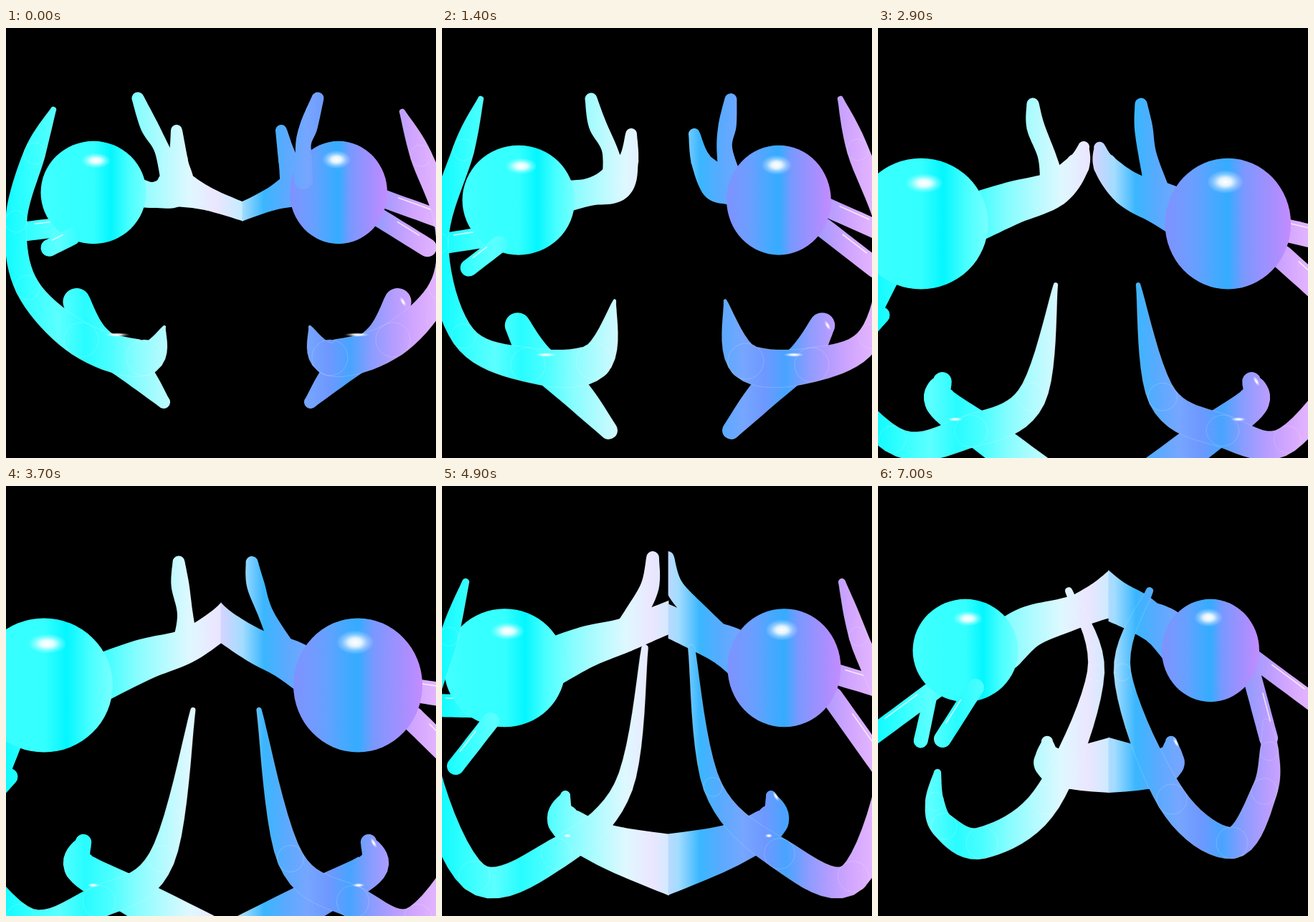
Animation of 600x600 px, one loop 7.1 s. Source, as an HTML page:

```html
<!DOCTYPE html>
<html lang="en">
<head>
<meta charset="utf-8">
<title>Mirrored limbs</title>
<style>
html, body { margin: 0; width: 100%; height: 100%; overflow: hidden; background: #000; }
svg { display: block; width: 100vw; height: 100vh; }
</style>
</head>
<body>
<svg viewBox="0 0 600 600">
  <defs id="defs">
    <clipPath id="clipL"><rect id="cutL" x="-200" y="-100" width="500" height="900"/></clipPath>
    <clipPath id="clipR"><rect id="cutR" x="300" y="-100" width="600" height="900"/></clipPath>
  </defs>
  <rect width="600" height="600"/>
  <g id="L" clip-path="url(#clipL)" fill="url(#skinL)"></g>
  <g id="R" clip-path="url(#clipR)" fill="url(#skinR)"></g>
</svg>
<script>
const LOOP = 7100, STEP = 100;
const TIMES = [0, 1400, 2900, 3700, 4900, 5700, 7000];
const $ = id => document.getElementById(id);

function add(parent, tag, attrs = {}) {
  const el = document.createElementNS('http://www.w3.org/2000/svg', tag);
  for (const k in attrs) el.setAttribute(k, attrs[k]);
  return $(parent).appendChild(el);
}

// Evenly spaced colour stops.
function gradient(id, colors, attrs, tag = 'linearGradient') {
  add('defs', tag, { id, ...attrs });
  colors.split(' ').forEach((c, i, all) =>
    add(id, 'stop', { offset: i / (all.length - 1), 'stop-color': c }));
}
const wide = (x1, x2) => ({ gradientUnits: 'userSpaceOnUse', x1, y1: 0, x2, y2: 0 });
gradient('skinL', '#12fbff #38ffff #5cffff #28fcff #4cfeff #88fdff #b4fbff #dff8ff #ebe6ff #c4ecff', wide(0, 330));
gradient('skinR', '#d6d4ff #a2dcff #3ab6ff #5aaaff #76a6ff #6f98ff #48a4ff #8a9cff #b49cff #d2a6ff #e2b4ff', wide(300, 600));
gradient('ballL', '#44ffff #3affff #36ffff #34ffff #04f6ff #48ffff #78ffff', {});
gradient('ballR', '#7f92ff #7499ff #66a0ff #4aa8ff #34acff #7a98ff #9492ff #aa8eff #c48cff', {});
gradient('gloss', '#fff #fffd #fff5 #fff0', {}, 'radialGradient');

// Monotone cubic through key poses.
function pose(keys, t) {
  const n = TIMES.length - 1;
  let i = 0;
  while (i < n - 1 && t >= TIMES[i + 1]) i++;
  const h = TIMES[i + 1] - TIMES[i], u = Math.min(1, (t - TIMES[i]) / h), v = 1 - u;
  return keys[0].map((_, c) => {
    const slope = j => (keys[j + 1][c] - keys[j][c]) / (TIMES[j + 1] - TIMES[j]);
    const tangent = j => {
      if (j === 0) return slope(0);
      if (j === n) return slope(n - 1);
      const a = slope(j - 1), b = slope(j);
      return a * b > 0 ? 2 * a * b / (a + b) : 0;
    };
    const a = keys[i][c], b = keys[i + 1][c];
    return a + (b - a) * u * u * (3 - 2 * u) + h * u * v * (tangent(i) * v - tangent(i + 1) * u);
  });
}
const num = (list, t) => pose(list.map(v => [v]), t)[0];

const spline = (a, b, c, d, u) =>
  b + u * ((c - a) / 2 + u * (a - 2.5 * b + 2 * c - d / 2 + u * (1.5 * (b - c) + (d - a) / 2)));

// Outline of a round tube through [x, y, radius] points.
function outline(pts) {
  const n = pts.length, fine = [], left = [], right = [];
  const p = i => pts[Math.max(0, Math.min(n - 1, i))];
  for (let s = 0; s <= (n - 1) * 10; s++) {
    const i = Math.min(n - 2, Math.floor(s / 10));
    fine.push(p(i).map((_, c) => spline(p(i - 1)[c], p(i)[c], p(i + 1)[c], p(i + 2)[c], s / 10 - i)));
  }
  fine.forEach(([x, y, r], i) => {
    const a = fine[Math.max(0, i - 1)], b = fine[Math.min(fine.length - 1, i + 1)];
    const dx = b[0] - a[0], dy = b[1] - a[1], k = r / (Math.hypot(dx, dy) || 1);
    left.push([x + dy * k, y - dx * k]);
    right.unshift([x - dy * k, y + dx * k]);
  });
  const xy = q => q.map(z => z.toFixed(1)).join(' ');
  const line = q => q.map(xy).join('L');
  const cap = (r, q) => `A${r} ${r} 0 0 1 ${xy(q)}`;
  let d = 'M' + line(left) + cap(p(n)[2], right[0]) + 'L' + line(right) + cap(p(0)[2], left[0]) + 'Z';
  for (const [x, y, r] of pts.slice(1, -1))
    d += `M${x - r} ${y}` + cap(r, [x + r, y]) + cap(r, [x - r, y]) + 'Z';
  return d;
}

// Pairs of coordinates per key; radii blend through a few profiles.
const limb = (keys, profiles, blend) => t => {
  const xy = pose(keys, t), w = num(blend, t);
  const i = Math.min(profiles.length - 2, Math.floor(w)), u = w - i;
  return profiles[i].map((r, j) => [xy[2 * j], xy[2 * j + 1], r + (profiles[i + 1][j] - r) * u]);
};
const flip = (pts, sum) => pts.map(([x, y, r], i) => [sum(i) - x, y, r]);

// Long hook, from outer tip to inner tip
const hook = limb([
  [66,114, 40,175, 14,270, 30,362, 105,435, 193,460, 221,417],
  [54,99, 30,170, -6,300, 30,430, 120,470, 212,465, 241,380],
  [-60,110, -100,230, -100,420, 20,574, 130,562, 214,515, 248,358],
  [-60,115, -100,240, -100,430, 20,603, 130,580, 217,520, 261,312],
  [33,134, 10,210, -28,360, 45,545, 160,513, 253,420, 283,226],
  [45,344, 38,400, 42,455, 105,500, 225,442, 290,330, 288,169],
  [83,400, 79,440, 92,475, 145,498, 235,437, 304,260, 266,146]
], [[4, 15, 15, 17, 24, 25, 2], [5, 13, 18, 22, 21, 12, 5]], [0, 0, .35, .5, .9, 1, 1]);
const tipShift = [[-26,3], [-26,0], [-66,20], [-64,20], [-40,0], [-50,-134], [-20,-70]];

// Lower hand, from knob outwards
const hand = limb([
  [98,381, 122,432, 180,478, 220,522],
  [105,414, 132,460, 185,508, 233,562],
  [90,492, 88,522, 150,568, 240,635],
  [108,497, 104,532, 175,572, 290,635],
  [172,432, 170,467, 230,502, 335,532],
  [207,386, 208,416, 255,437, 335,446],
  [236,357, 240,386, 270,394, 335,389]
], [[19, 22, 21, 9], [7, 23, 30, 44]], [0, .1, .5, .65, 1, 1, .9]);

// Arm beyond the ball: wrist, palm, knuckle, fingertip
const arm = limb([
  [205,233, 236,222, 240,185, 238,143],
  [205,229, 242,216, 260,185, 264,148],
  [185,245, 245,225, 278,192, 287,166],
  [190,243, 250,224, 295,196, 325,172],
  [200,225, 255,208, 310,186, 340,176],
  [210,213, 260,195, 310,172, 340,160],
  [210,197, 262,180, 310,165, 340,156]
], [[18, 26, 14, 8], [30, 25, 17, 8], [29, 24, 22, 24]], [0, .1, 1, 2, 2, 2, 2]);

// Raised finger above the palm
const finger = limb([
  [218,170, 200,137, 184,98],
  [234,170, 217,135, 208,99],
  [236,180, 220,138, 216,106],
  [250,180, 243,138, 241,106],
  [270,180, 290,140, 294,100],
  [270,172, 303,140, 325,98],
  [280,172, 312,148, 340,122]
], [[11, 12.5, 8.5], [17, 13, 9], [21, 17, 15]], [0, 0, .3, 0, .8, 2, 2]);

// Mirror sums (left x + right x) and other tracks
const depth = [0, .22, .9, 1, .5, .14, 0];
const seam = [330, 310, 297, 300, 316, 318, 322];
const lowSum = [645, 636, 611, 614, 631, 640, 645];
const palmSum = [646, 627, 595, 600, 615, 620, 622];
const tipSum = [622, 616, 596, 600, 625, 630, 640];
const fingerSum = [619, 611, 583, 584, 609, 625, 644];
const farLeg = [[25,284], [0,301], [-15,400], [-14,402], [-10,306], [-10,328], [-10,350]];
const nearLeg = [[92,291, 60,307], [80,302, 37,335], [5,400, -40,450], [5,405, -40,455],
  [68,328, 19,391], [106,299, 62,361], [136,281, 90,353]];
const highLeg = [270, 285, 293, 292, 282, 295, 308];
const lowLeg = [[589,307], [605,335], [620,370], [620,376], [612,390], [568,350], [545,352]];
const sheen = [[155,428], [145,456], [108,546], [122,557], [175,488], [204,452], [225,428]];

// Elements in painting order
const els = {};
const make = (side, tag, names, attrs) => names.split(' ').forEach(k => els[k + side] = add(side, tag, attrs));
const streak = { stroke: '#fff', 'stroke-width': 1.6, 'stroke-linecap': 'round', opacity: .75 };
const rim = { stroke: '#fff', 'stroke-opacity': .18 };
const gloss = { fill: 'url(#gloss)' };
for (const side of 'LR') {
  const near = () => { make(side, 'path', 'near'); make(side, 'path', 'nearLine', streak); };
  make(side, 'path', 'far');
  make(side, 'path', 'farLine', streak);
  if (side === 'R') near();
  make(side, 'path', 'extra arm finger tail');
  make(side, 'ellipse', 'ball', { fill: `url(#ball${side})` });
  make(side, 'ellipse', 'shine', gloss);
  make(side, 'path', 'front');
  if (side === 'L') near();
  make(side, 'path', 'hand');
  make(side, 'path', 'hook', rim);
  make(side, 'ellipse', 'sheen glint', gloss);
}

const path = (name, pts) => els[name].setAttribute('d', outline(pts));
const oval = (name, cx, cy, rx, ry) =>
  Object.entries({ cx, cy, rx, ry }).forEach(([k, v]) => els[name].setAttribute(k, v.toFixed(2)));

function leg(name, side, x, y, X, Y, r) {
  path(name + side, [[x, y, r], [X, Y, r]]);
  const len = Math.hypot(X - x, Y - y), s = (side === 'L' ? -1 : 1) * r * .65 / len;
  const at = u => `${x + (X - x) * u + (Y - y) * s} ${y + (Y - y) * u - (X - x) * s}`;
  els[name + 'Line' + side].setAttribute('d', `M${at(.3)}L${at(.75)}`);
}

function draw(t) {
  const k = num(depth, t), cut = num(seam, t);
  $('cutL').setAttribute('width', cut + 200.4);
  $('cutR').setAttribute('x', cut - .4);

  const r = 71.7 + 21.8 * k, y = 229.5 + 48.5 * k;
  const xL = 122 - 69 * k, rL = r * 1.025, xR = 464 + 27 * k, rR = 68 + 22 * k;
  oval('ballL', xL, y, rL, r);
  oval('ballR', xR, y, rR, r);
  oval('shineL', xL + .05 * r, y - .62 * r, .29 * r, .15 * r);
  oval('shineR', xR - .04 * r, y - .64 * r, .28 * r, .18 * r);

  // Upper limbs
  const palm = num(palmSum, t), tip = num(tipSum, t), point = num(fingerSum, t);
  const armL = arm(t), armR = flip(armL, i => [palm - 15, palm, (palm + tip) / 2, tip][i]);
  const upL = finger(t), upR = flip(upL, i => point + (650 - point) * ((2 - i) / 3) ** 2);
  const base = armL[0][2] + 5;
  path('armL', [[xL + .7 * r, y - .05 * r, base], ...armL]);
  path('armR', [[xR - .5 * r, y - .05 * r, base], ...armR]);
  path('fingerL', [[armL[1][0], armL[1][1], 19], ...upL]);
  path('fingerR', [[armR[0][0], armR[0][1], 19], ...upR]);

  // The joined wrist that lets go early on
  const hold = Math.max(0, 1 - t / TIMES[1]);
  const tail = [armL, armR].map(([, [px, py]], side) => [[0, 28], [.5, 16], [1.18, 12]].map(([u, w]) =>
    [px + (cut - px) * u * hold, py + 34 * u * hold, w * hold]));
  ['L', 'R'].forEach((s, i) => els['tail' + s].setAttribute('d', hold ? outline(tail[i]) : ''));
  els.frontR.setAttribute('d', hold
    ? outline([[armR[1][0] + 5, armR[1][1] - 10, 13 * hold], [upR[0][0], upR[0][1] + 10, 12 * hold]]) : '');

  // Legs
  const [fx, fy] = pose(farLeg, t), [nx, ny] = pose(lowLeg, t);
  leg('far', 'L', xL - .45 * r, y + .65 * r, fx, fy, 13.5 + 5 * k);
  leg('near', 'L', ...pose(nearLeg, t), 12);
  leg('far', 'R', xR + .75 * rR, y + .06 * r, 615, num(highLeg, t), 12.5 + 4 * k);
  leg('near', 'R', xR + .85 * rR, y + .5 * r, nx, ny, 13 + 4 * k);
  const grow = Math.max(0, (t - TIMES[5]) / (TIMES[6] - TIMES[5]));
  const ex = xL - .62 * r, ey = y + .62 * r;
  path('extraL', [[ex, ey, 9], [ex - 18 * grow, ey + 82 * grow, 10 * grow]]);

  // Lower limbs
  const low = num(lowSum, t), [sx, sy] = pose(tipShift, t);
  const handL = hand(t), handR = flip(handL, () => low);
  const hookL = hook(t), pull = [1, 1, .7];
  const hookR = flip(hookL, () => low).map(([hx, hy, w], i) =>
    [hx + sx * (pull[i] || (i === 3 ? .3 : 0)), hy + sy * (pull[i] || 0), w]);
  path('handL', handL);
  path('handR', handR);
  path('hookL', hookL);
  path('hookR', hookR);

  const [gx, gy] = pose(sheen, t), fade = 1 - t / LOOP;
  oval('sheenL', gx, gy, 18 * fade, 3);
  oval('sheenR', low - gx, gy, 18 * fade, 3);
  const [kx, ky] = handR[0];
  oval('glintR', 0, 0, 3, 8);
  els.glintR.setAttribute('transform', `translate(${kx + 7} ${ky + 1}) rotate(-30)`);
}

const start = performance.now();
function tick() {
  const t = (performance.now() - start) % LOOP;
  draw(Math.floor(t / STEP) * STEP);
  requestAnimationFrame(tick);
}
tick();
</script>
</body>
</html>
```
